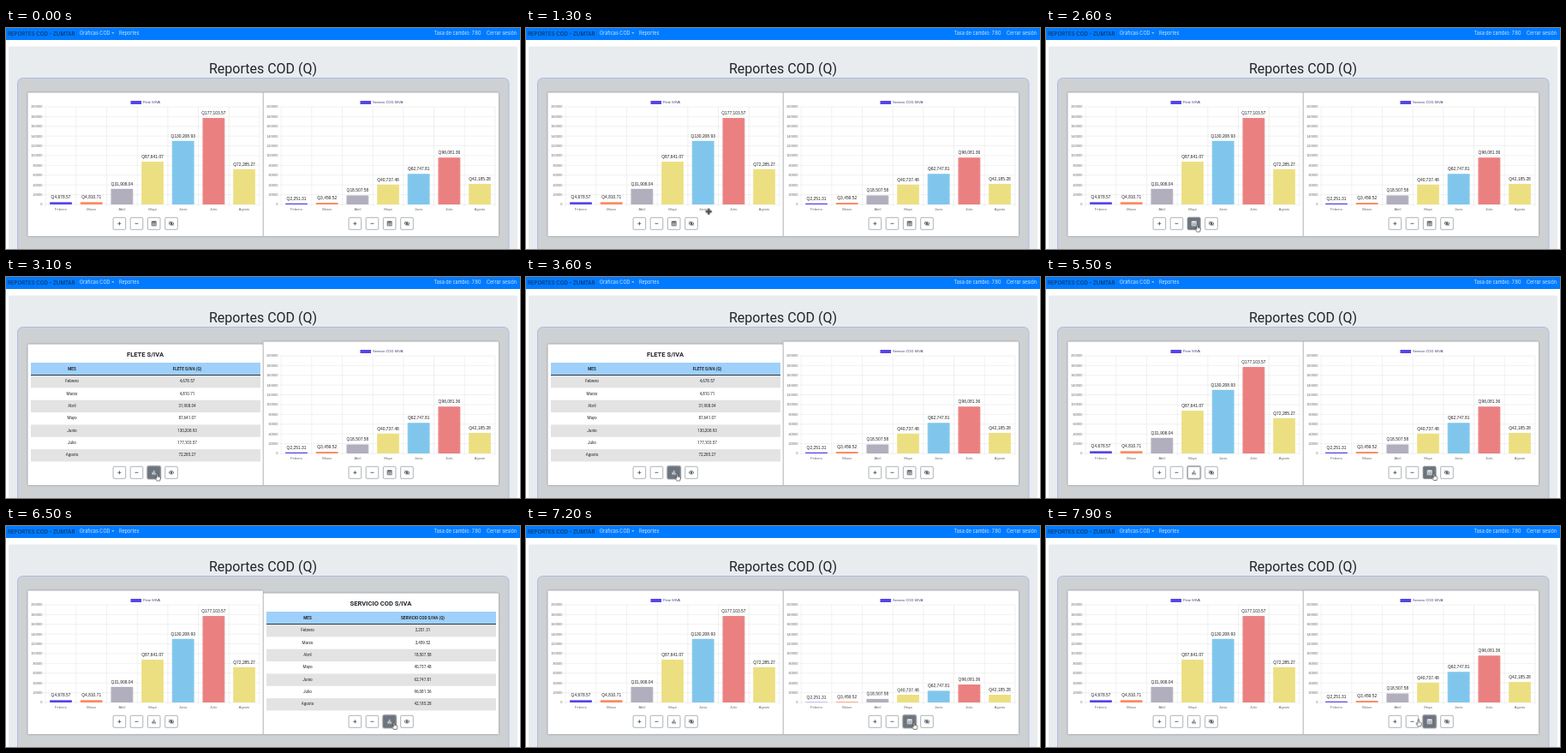
An HTML page that plays this animation: 600 px wide and 258 px high, repeating every 8 s.

```html
<!DOCTYPE html>
<html lang="es">
<head>
<meta charset="utf-8">
<title>Reportes COD</title>
<style>
html, body { margin: 0; width: 100%; height: 100%; overflow: hidden; background: #fff; }
svg { display: block; width: 600px; height: 258px; }
text { font-family: Roboto, sans-serif; fill: #212529; }
.nav text { font: 5.5px Inter, sans-serif; fill: #d3e7ff; }
.nav .brand { font-size: 6.1px; fill: #0b2545; }
.mid { text-anchor: middle; }
.end { text-anchor: end; }
.bold { font-weight: 700; }
.card { fill: #fff; filter: drop-shadow(0 .8px 1px rgba(0, 0, 0, .4)); }
.grid { stroke: #e3e3e3; stroke-width: .5; fill: none; }
.chart text { font: 4px "Liberation Sans", Arial, sans-serif; fill: #666; }
.chart .legend { fill: #3a3a78; }
.chart .value { font-size: 4.9px; fill: #222; }
.cell { font-size: 4.6px; }
.btn { color: #3d444a; }
.hot { color: #fff; }
.frame { fill: #fff; stroke: #777e85; stroke-width: .6; }
.hot .frame { fill: #6c757d; stroke: #6c757d; }
.ring { fill: none; stroke: #6c757d; stroke-opacity: .55; stroke-width: 1.3; }

.on-table, .on-chart, .bar, .value, .hot, .ring, .cursor, .hand, .move {
  animation: 8s infinite;
}
.on-table, .on-chart, .ring, .hand, .move { animation-timing-function: step-end; }
.left .on-table { animation-name: tableL; }
.left .on-chart { animation-name: chartL; }
.left .icon-grid { animation-name: gridL; }
.left .icon-bars { animation-name: barsL; }
.left .bar { animation-name: growL; }
.left .value { animation-name: riseL; }
.left .hot { animation-name: hotL; animation-timing-function: linear; }
.left .eye .hot { animation-name: eyeL; }
.left .ring { animation-name: ringL; }
.right .on-table { animation-name: tableR; }
.right .on-chart { animation-name: chartR; }
.right .bar { animation-name: growR; }
.right .value { animation-name: riseR; }
.right .hot { animation-name: hotR; animation-timing-function: linear; }
.right .eye .hot { animation: none; opacity: 0; }
.right .ring { animation-name: ringR; }
.cursor { animation-name: path; animation-timing-function: ease-in-out; }
.hand { animation-name: hand; }
.move { animation-name: move; }

@keyframes tableL { 0%, 51.25% { opacity: 0 } 38.75% { opacity: 1 } }
@keyframes chartL { 0%, 51.25% { opacity: 1 } 38.75% { opacity: 0 } }
@keyframes gridL { 0% { opacity: 1 } 38.75% { opacity: 0 } }
@keyframes barsL { 0% { opacity: 0 } 38.75% { opacity: 1 } }
@keyframes tableR { 0%, 88.75% { opacity: 0 } 75% { opacity: 1 } }
@keyframes chartR { 0%, 88.75% { opacity: 1 } 75% { opacity: 0 } }
@keyframes growL {
  0%, 51.24% { transform: scaleY(1) }
  51.25% { transform: scaleY(0); animation-timing-function: cubic-bezier(.25, 1, .5, 1) }
  63.75%, 100% { transform: scaleY(1) }
}
@keyframes riseL {
  0%, 51.24% { transform: translateY(0) }
  51.25% { transform: translateY(var(--h)); animation-timing-function: cubic-bezier(.25, 1, .5, 1) }
  63.75%, 100% { transform: translateY(0) }
}
@keyframes growR {
  0%, 88.74% { transform: scaleY(1) }
  88.75% { transform: scaleY(0); animation-timing-function: cubic-bezier(.25, 1, .5, 1) }
  100% { transform: scaleY(1) }
}
@keyframes riseR {
  0%, 88.74% { transform: translateY(0) }
  88.75% { transform: translateY(var(--h)); animation-timing-function: cubic-bezier(.25, 1, .5, 1) }
  100% { transform: translateY(0) }
}
@keyframes hotL { 0%, 27.5% { opacity: 0 } 29.4%, 55.3% { opacity: 1 } 57%, 100% { opacity: 0 } }
@keyframes eyeL { 0%, 54.8% { opacity: 0 } 55.6% { opacity: .6 } 57%, 100% { opacity: 0 } }
@keyframes hotR { 0%, 65.6% { opacity: 0 } 67.5%, 98.75% { opacity: 1 } 100% { opacity: .95 } }
@keyframes ringL { 0%, 73% { opacity: 0 } 37% { opacity: 1 } }
@keyframes ringR { 0% { opacity: 0 } 73% { opacity: 1 } }
@keyframes path {
  0%, 15% { transform: translate(214px, 214px) }
  27.5%, 53.75% { transform: translate(177px, 229.5px) }
  56.25% { transform: translate(206px, 229px) }
  66.25%, 95.6% { transform: translate(453.5px, 229px) }
  98.75%, 100% { transform: translate(435px, 225.5px) }
}
@keyframes hand { 0%, 55.4% { opacity: 0 } 27%, 66% { opacity: 1 } }
@keyframes move { 0%, 27%, 66% { opacity: 0 } 15%, 55.4% { opacity: 1 } }
</style>
</head>
<body>
<svg id="stage" viewBox="0 0 600 258">
  <defs>
    <g id="plus"><path d="M-2 0H2M0-2V2" stroke="currentColor" stroke-width=".8"/></g>
    <g id="minus"><path d="M-2 0H2" stroke="currentColor" stroke-width=".8"/></g>
    <g id="table" fill="currentColor">
      <path fill-rule="evenodd" d="M-2.8-2.2Q-2.8-2.7-2.3-2.7H2.3Q2.8-2.7 2.8-2.2V2.2Q2.8 2.7 2.3 2.7H-2.3Q-2.8 2.7-2.8 2.2ZM-2.1-1.1V.3H-.3V-1.1ZM.3-1.1V.3H2.1V-1.1ZM-2.1.9V2H-.3V.9ZM.3.9V2H2.1V.9Z"/>
    </g>
    <g id="bars"><path d="M-1.7 2.4V-.2M0 2.4V-2.4M1.7 2.4V.6" stroke="currentColor" stroke-width="1"/></g>
    <g id="eye" fill="none" stroke="currentColor" stroke-width=".8">
      <path d="M-3 0Q0-3.7 3 0Q0 3.7-3 0Z"/><circle r=".8" fill="currentColor"/>
    </g>
    <g id="slash"><use href="#eye"/><path d="M-2.7-2.4L2.7 2.4" stroke="currentColor" stroke-width=".8"/></g>
  </defs>
  <g class="nav">
    <rect width="600" height="14" fill="#007bff"/>
    <text class="brand" x="2" y="8.6">REPORTES COD - ZUMTAR</text>
    <text x="86" y="8.2">Gráficas COD</text>
    <path d="M123.4 5.2h3l-1.5 1.6z" fill="#d3e7ff"/>
    <text x="132" y="8.2">Reportes</text>
    <text x="499.5" y="8.2">Tasa de cambio: 7.80</text>
    <text x="561" y="8.2">Cerrar sesión</text>
  </g>
  <rect x="3" y="21.5" width="594" height="250" rx="2" fill="#e9ecef"/>
  <text class="mid" x="300" y="52.5" font-size="16">Reportes COD (Q)</text>
  <rect x="13.5" y="58.5" width="573.5" height="220" rx="6" fill="#ced1d4" stroke="#a3b1e6" stroke-width=".8"/>
</svg>
<script>
const MONTHS = ['Febrero', 'Marzo', 'Abril', 'Mayo', 'Junio', 'Julio', 'Agosto'];
const COLORS = ['#5546e6', '#fb8b62', '#b1aebd', '#ecdf82', '#80c6ec', '#ea8080', '#ecdf82'];
const BASE = 206, LEFT = 46.2, STEP = 35.67, TICK = 11.4;

const money = n => n.toLocaleString('en-US', { minimumFractionDigits: 2 });
const text = (x, y, s, cls = '', extra = '') => `<text class="${cls}" x="${x}" y="${y}" ${extra}>${s}</text>`;
const rect = (x, y, w, h, extra) => `<rect x="${x}" y="${y}" width="${w}" height="${h}" ${extra}/>`;
const use = (id, cls = '') => `<use href="#${id}" class="${cls}"/>`;
const range = (n, fn) => Array.from({ length: n }, (_, i) => fn(i)).join('');

function chart({ label, values, legendX }) {
  const right = LEFT + 7 * STEP;
  const rows = range(11, i => {
    const y = BASE - i * TICK;
    return `<path class="grid" d="M${LEFT - 2} ${y}H${right}"/>` + text(42.5, y + 1.4, i * 20000, 'end');
  });
  const cols = range(8, i => `<path class="grid" d="M${LEFT + i * STEP} ${BASE - 10 * TICK}V${BASE + 2}"/>`);
  const bars = values.map((v, i) => {
    const h = v / 20000 * TICK;
    return `<g transform="translate(${LEFT + (i + .5) * STEP} ${BASE})">
      ${rect(-12.85, -h, 25.7, h, `class="bar" fill="${COLORS[i]}"`)}
      ${text(0, -h - 4.2, 'Q' + money(v), 'value mid', `style="--h:${h}px"`)}
      ${text(0, 7.2, MONTHS[i], 'mid')}</g>`;
  }).join('');
  return `<g class="chart on-chart">${rect(25.5, 75.5, 274.5, 167.5, 'class="card" rx="1"')}
    ${rows}${cols}${rect(legendX, 85, 12.6, 4, `fill="${COLORS[0]}"`)}
    ${text(legendX + 14.6, 88.3, label, 'legend')}${bars}</g>`;
}

function table({ label, values }) {
  const title = label.toUpperCase();
  const rows = values.map((v, i) => {
    const y = 115 + i * 14.35;
    return (i % 2 ? '' : rect(29, y, 268, 14.35, 'fill="#e3e3e3"')) +
      text(77, y + 8.3, MONTHS[i], 'cell mid') + text(211.5, y + 8.3, money(v), 'cell mid');
  }).join('');
  return `<g class="on-table">${rect(25.5, 78.5, 274.5, 164.5, 'class="card" rx="1"')}
    ${text(162.5, 92.6, title, 'mid bold', 'font-size="7.6"')}
    ${rect(29, 100, 268, 14.5, 'fill="#9fd0fb"')}${rect(29, 114, 268, 1, 'fill="#2b3a48"')}
    ${text(77, 108.8, 'MES', 'cell mid bold')}${text(211.5, 108.8, title + ' (Q)', 'cell mid bold')}
    ${rows}</g>`;
}

function button(x, icon, cls = '', ring = '') {
  const face = rect(-7.3, -7, 14.6, 14, 'class="frame" rx="1.2"') + icon;
  const hot = cls ? `<g class="hot">${face}</g>` : '';
  return `<g class="btn ${cls}" transform="translate(${x} 228.3)">${face}${ring}${hot}</g>`;
}

function panel(side, dx, data) {
  const toggle = use('table', 'on-chart icon-grid') + use('bars', 'on-table icon-bars');
  const eye = use('slash', 'on-chart') + use('eye', 'on-table');
  const ring = rect(-7.8, -7.5, 15.6, 15, 'class="ring" rx="1.6"');
  return `<g class="${side}" transform="translate(${dx} 0)">${chart(data)}${table(data)}
    ${button(132.4, use('plus'))}${button(152.5, use('minus'))}
    ${button(172.7, toggle, 'toggle', ring)}${button(193, eye, 'eye')}</g>`;
}

const cursor = `<g class="cursor" stroke="#222" stroke-width=".6" stroke-linejoin="round" fill="#fff">
  <path class="hand" d="M-1 .8Q-1 0-.3 0T.4.8V3.4L2.8 4Q3.6 4.4 3.4 5.6L2.6 8.4H-1L-3 5.2Q-3 4.2-1.9 4.7L-1 5.5Z"/>
  <g class="move">${[0, 90, 180, 270].map(a =>
    `<path transform="rotate(${a})" d="M-.5 0V-2H-1.4L0-3.7L1.4-2H.5V0Z" fill="#555"/>`).join('')}
    <circle r=".7"/></g></g>`;

document.getElementById('stage').insertAdjacentHTML('beforeend',
  panel('left', 0, {
    label: 'Flete S/IVA', legendX: 145.5,
    values: [4678.57, 4810.71, 31908.04, 87641.07, 130208.93, 177103.57, 72285.27]
  }) +
  panel('right', 275, {
    label: 'Servicio COD S/IVA', legendX: 138.5,
    values: [2251.31, 3459.52, 18507.58, 40737.48, 62747.81, 96081.36, 42185.28]
  }) + cursor);
</script>
</body>
</html>
```
